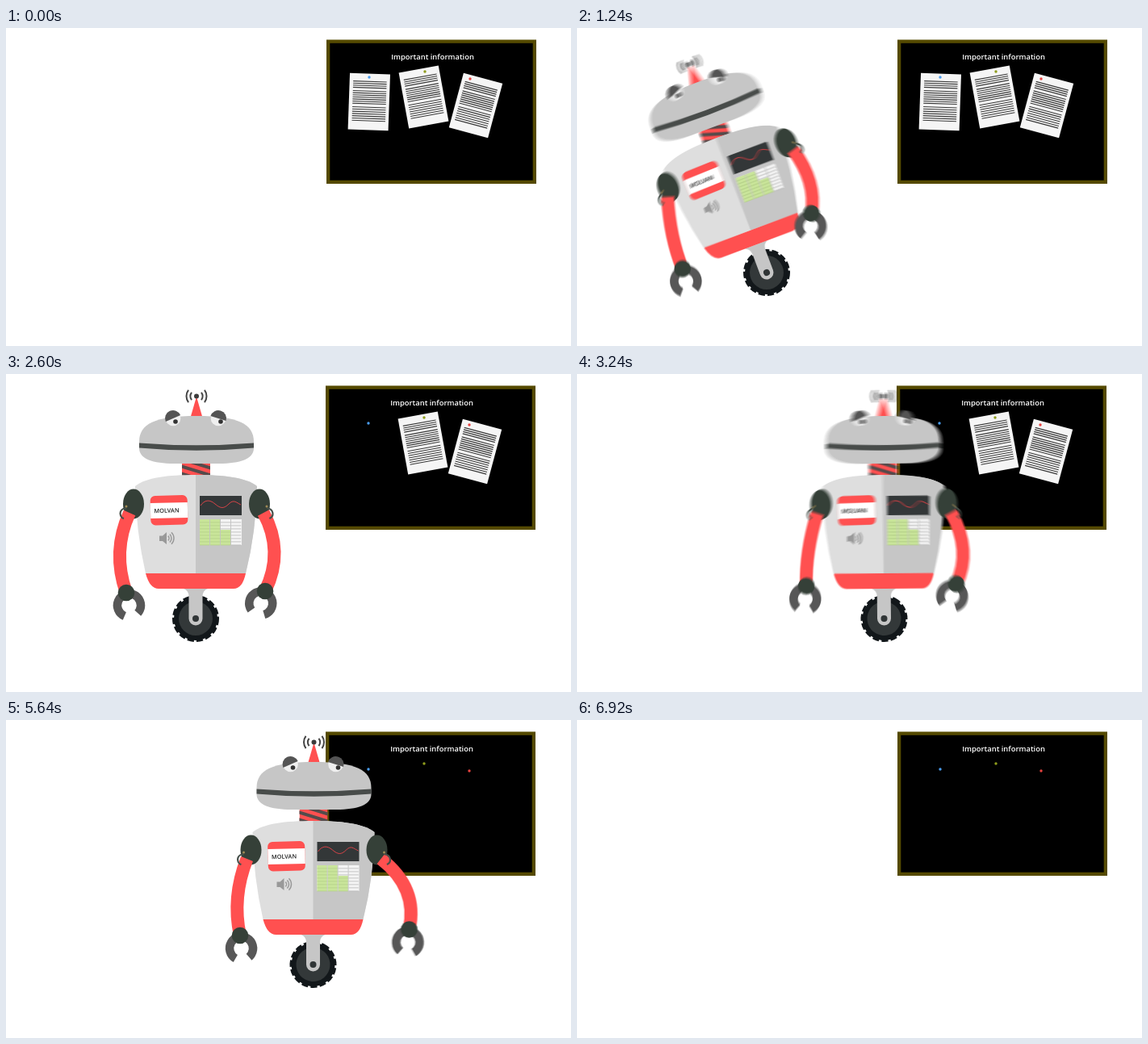
An HTML page with a canvas that plays this animation: 700x394 px, repeating every 8000 ms.

```html
<!DOCTYPE html>
<html lang="en">
<head>
<meta charset="utf-8">
<title>Robot and board</title>
<style>
html, body { margin: 0; width: 100%; height: 100%; overflow: hidden; background: #fff; }
canvas { display: block; width: 100vw; height: 100vh; }
</style>
</head>
<body>
<canvas id="stage" width="700" height="394"></canvas>
<script>
const W = 700, H = 394, LOOP = 8000, STEP = 40, SAMPLES = 10;
const RED = '#ff5050', DARK = '#354038', GREY = '#c6c6c6', CLAW = '#575757';
const AXLE = { x: 235, y: 303 };

const stage = document.getElementById('stage').getContext('2d');
const buffer = document.createElement('canvas');
buffer.width = W;
buffer.height = H;
const scratch = buffer.getContext('2d');

// Rows are [time, ...values]; every leg eases in and out.
const smooth = u => u * u * (3 - 2 * u);
const clamp = u => Math.max(0, Math.min(1, u));
const mix = (a, b, u) => a + (b - a) * u;
function track(rows, t) {
  let i = 0;
  while (i < rows.length - 2 && t >= rows[i + 1][0]) i++;
  const a = rows[i], b = rows[i + 1];
  const u = smooth(clamp((t - a[0]) / (b[0] - a[0])));
  return a.slice(1).map((v, k) => mix(v, b[k + 1], u));
}

const ROLL = [[440, -115], [800, 235], [2940, 235], [3200, 380.5], [6280, 380.5], [7200, 940]];
const LEAN = [[440, -12], [660, -12], [940, 23], [1170, -22], [1530, 3], [1700, 0],
  [2940, 0], [3080, -5], [3600, 20], [3860, -13], [4080, 2], [4180, 0],
  [6220, 0], [6340, -4], [6680, -27], [7000, -22]];
// How far the arms are raised by the ride
const LIFT = [[440, 1], [1480, 1], [1800, 0], [2940, 0], [3120, 1], [3800, 1], [4180, .45], [6240, .45], [6500, 1]];

// Wrist x, y and the bend of the arm x, y
const REST = [321, 269, 345, 220], FRONT = [290, 230, 366, 221];
const ARM = [
  [1500, ...REST], [1800, 428, 122, 360, 190], [2000, ...FRONT], [2140, ...FRONT], [2440, ...REST],
  [4100, ...REST], [4420, 352, 130, 375, 185], [4620, ...FRONT], [4760, ...FRONT],
  [5040, 420, 132, 370, 195], [5240, ...FRONT], [5400, ...FRONT],
  [5600, 353, 263, 366, 208], [5860, ...REST]
];

const PAPERS = [
  { x: 449.8, y: 91.5, turn: 2, take: 1800, pin: [450, 61], color: '#4a9df0' },
  { x: 517.5, y: 85.5, turn: -10.4, take: 4420, pin: [519, 54], color: '#8f9d1c' },
  { x: 582, y: 96, turn: 15, take: 5040, pin: [575, 63], color: '#e8423f' }
];

const rad = deg => deg * Math.PI / 180;

function fill(g, color, path) {
  g.fillStyle = color;
  g.fill(path);
}
function disc(g, x, y, r, color) {
  g.fillStyle = color;
  g.beginPath();
  g.arc(x, y, r, 0, 7);
  g.fill();
}
function rect(g, x, y, w, h, color) {
  g.fillStyle = color;
  g.fillRect(x, y, w, h);
}
function arc(g, x, y, r, from, to, color, width) {
  g.strokeStyle = color;
  g.lineWidth = width;
  g.beginPath();
  g.arc(x, y, r, from, to);
  g.stroke();
}

function drawPaper(g, x, y, turn, w, h) {
  g.save();
  g.translate(x, y);
  g.rotate(rad(turn));
  g.scale(w / 50, h / 70);
  rect(g, -25, -35, 50, 70, '#f5f5f5');
  for (const [top, count, gap] of [[-25.2, 4, 2.6], [-13.3, 7, 2.6], [6.7, 7, 2.8]])
    for (let i = 0; i < count; i++) rect(g, -20.5, top + i * gap - .55, 41.5, 1.1, '#383838');
  g.restore();
}

function drawBoard(g, t) {
  const drift = smooth(clamp((t - 6300) / 500)) - smooth(clamp((t - 1500) / 800));
  g.save();
  g.translate(drift, 0);
  rect(g, 397, 14.5, 260, 178.5, '#554a00');
  rect(g, 401.3, 18.8, 251.4, 169.9, '#000');
  g.fillStyle = '#fff';
  g.font = '600 9.4px "Open Sans", cursive, sans-serif';
  g.textAlign = 'center';
  g.fillText('Important information', 528.5, 38.7);
  for (const p of PAPERS) {
    if (t < p.take) drawPaper(g, p.x, p.y, p.turn, 50, 70);
    disc(g, ...p.pin, 1.7, p.color);
  }
  g.restore();
}

const HEAD = new Path2D('M165 84C165 62 184 52 236 52S307 62 307 84V92C307 105 290 111 264 111H208C182 111 165 105 165 92Z');
const MOUTH = new Path2D('M165 85.5Q236 91 307 85.5V91.5Q236 98 165 91.5Z');
const BODY = new Path2D('M160 139C174 128 200 125 235 125S297 128 311 139Q310 195 297 247H173Q161 195 160 139Z');
const HEM = new Path2D('M173 247H297Q293 266 282 266H189Q178 266 173 247Z');
const FORK = new Path2D('M220 266H250Q244 268 243.5 275V303A8.5 8.5 0 0 1 226.5 303V275Q226 268 220 266Z');
const SPEAKER = new Path2D('M190 200.5H194L199 196V211L194 207H190Z');
const WAVE = new Path2D('M241 163C246 156 252 155 259 161S270 167 276 161S285 159 291 162');

function drawWheel(g, spin) {
  g.save();
  g.translate(AXLE.x, AXLE.y);
  g.rotate(spin);
  disc(g, 0, 0, 27, '#12171a');
  g.setLineDash([8, 3.1]);
  arc(g, 0, 0, 27, 0, Math.PI * 2, '#12171a', 4);
  g.setLineDash([]);
  disc(g, 0, 0, 21, '#333839');
  g.restore();
}

function drawEye(g, x, y, turn, px) {
  disc(g, x, y, 9.3, '#efefef');
  disc(g, px, 59, 2.8, '#333');
  g.fillStyle = '#545454';
  g.beginPath();
  g.arc(x, y, 10, Math.PI + turn, turn);
  g.fill();
}

function drawHead(g) {
  fill(g, RED, new Path2D('M236 28L243.5 54H228.5Z'));
  disc(g, 236, 27.5, 3, '#3c3c3c');
  for (const r of [7.5, 12.5]) {
    arc(g, 236, 27.5, r, -.65, .65, '#454545', 2);
    arc(g, 236, 27.5, r, Math.PI - .65, Math.PI + .65, '#454545', 2);
  }
  g.save();
  g.beginPath();
  g.rect(218, 110, 35, 17);
  g.clip();
  rect(g, 218, 110, 35, 17, RED);
  g.strokeStyle = '#554b4b';
  g.lineWidth = 4;
  for (const y of [105, 114, 123]) {
    g.beginPath();
    g.moveTo(216, y);
    g.lineTo(255, y + 12);
    g.stroke();
  }
  g.restore();
  fill(g, GREY, HEAD);
  fill(g, '#484c4a', MOUTH);
  drawEye(g, 207, 55, -.42, 210);
  drawEye(g, 263, 55, .3, 266);
}

function drawBadge(g) {
  g.save();
  g.translate(202, 168.5);
  g.rotate(rad(-1.5));
  g.fillStyle = RED;
  g.beginPath();
  g.roundRect(-23, -18, 46, 36.5, 6);
  g.fill();
  rect(g, -23, -9, 46, 19, '#fff');
  g.fillStyle = '#222';
  g.font = '600 7.3px "Open Sans", sans-serif';
  g.textAlign = 'center';
  g.fillText('MOLVAN', -3, 3.2);
  g.restore();
}

function drawPanel(g) {
  rect(g, 240, 151, 52, 24, '#333738');
  g.strokeStyle = '#d84448';
  g.lineWidth = 1;
  g.stroke(WAVE);
  rect(g, 240, 180, 52, 32, '#f4f4f4');
  const greenTop = [180, 180, 193, 212];
  greenTop.forEach((top, i) => {
    const x = 240 + i * 13;
    rect(g, x, top, 12.3, 212 - top, '#c9e59a');
    for (let y = 183.5; y < 212; y += 4) rect(g, x, y, 12.3, .8, y > top ? '#b4cf88' : '#b9b9b9');
    if (i) rect(g, x - .8, 180, .8, 32, '#bbb');
  });
}

function drawBody(g) {
  fill(g, '#dedede', BODY);
  g.save();
  g.clip(BODY);
  rect(g, 235, 120, 80, 130, GREY);
  g.restore();
  fill(g, RED, HEM);
  drawBadge(g);
  fill(g, '#999', SPEAKER);
  [4, 7, 10].forEach(r => arc(g, 198, 203.5, r, -.8, .8, '#999', 1.5));
  drawPanel(g);
}

function drawArm(g, sx, [hx, hy, cx, cy], side) {
  const a = Math.atan2(hy - cy, hx - cx);
  g.fillStyle = DARK;
  g.beginPath();
  g.ellipse(sx, 161, 13, 18.5, 0, 0, 7);
  g.fill();
  g.strokeStyle = RED;
  g.lineWidth = 16;
  g.beginPath();
  g.moveTo(sx + side * 5, 172);
  g.quadraticCurveTo(cx, cy, hx, hy);
  g.stroke();
  arc(g, sx + side * 10, 173, 6.5, side > 0 ? -1.7 : 1.9, side > 0 ? 1.2 : 4.9, '#46504a', 2.2);
  disc(g, sx + side * 9, 164, 1.5, '#a08a55');
  // The claw opens a little outward of the arm's end.
  const b = a - side * .12;
  arc(g, hx + 16 * Math.cos(b), hy + 16 * Math.sin(b), 14.5, b + .62, b + Math.PI * 2 - .62, CLAW, 10.5);
  disc(g, hx, hy, 10.3, DARK);
}

// A taken sheet swings to the chest, then slides inside.
function drawCarried(g, t, x) {
  for (const p of PAPERS) {
    const age = t - p.take;
    if (age < 0 || age > 360) continue;
    const u = smooth(clamp(age / 200)), v = smooth(clamp((age - 220) / 140));
    const px = mix(mix(p.x - x + AXLE.x, 302, u), 266, v);
    const py = mix(mix(p.y, 195, u), 205, v);
    drawPaper(g, px, py, mix(p.turn, -25, u), mix(mix(50, 108, u), 40, v), mix(mix(70, 22, u), 0, v));
  }
}

const pose = t => [ROLL, LEAN, LIFT, ARM].flatMap(rows => track(rows, t));

function drawRobot(g, t) {
  const [x, lean, lift, hx, hy, cx, cy] = pose(t);
  const left = [149 - 10 * lift, 271 - 9 * lift, 131 + 7 * lift, 220];
  const right = [hx + 4 * lift + .6 * lean, hy - 8 * lift - .35 * Math.abs(lean), cx + .6 * lean, cy];
  g.save();
  g.translate(x - AXLE.x, 0);
  drawWheel(g, (x - AXLE.x) / 28);
  g.translate(AXLE.x, AXLE.y);
  g.rotate(rad(lean));
  g.translate(-AXLE.x, -AXLE.y);
  fill(g, GREY, FORK);
  disc(g, AXLE.x, AXLE.y, 4, '#303536');
  drawHead(g);
  drawBody(g);
  drawArm(g, 158, left, -1);
  drawArm(g, 314, right, 1);
  drawCarried(g, t, x);
  g.restore();
}

function drawScene(g, t, robotTime) {
  rect(g, 0, 0, W, H, '#fff');
  drawBoard(g, t);
  if (t >= 480 && t < 6920) drawRobot(g, robotTime);
}

// Motion blur: a running average over one step.
function drawBlurred(t) {
  for (let i = 0; i < SAMPLES; i++) {
    drawScene(scratch, t, t - STEP * i / SAMPLES);
    stage.globalAlpha = 1 / (i + 1);
    stage.drawImage(buffer, 0, 0);
  }
  stage.globalAlpha = 1;
}

function render(t) {
  const now = pose(t), before = pose(t - STEP);
  if (now.every((v, i) => Math.abs(v - before[i]) < .02)) drawScene(stage, t, t);
  else drawBlurred(t);
}

const start = performance.now();
let last = -1;
function tick() {
  const t = Math.floor((performance.now() - start) % LOOP / STEP) * STEP;
  if (t !== last) render(last = t);
  requestAnimationFrame(tick);
}
tick();
</script>
</body>
</html>
```
